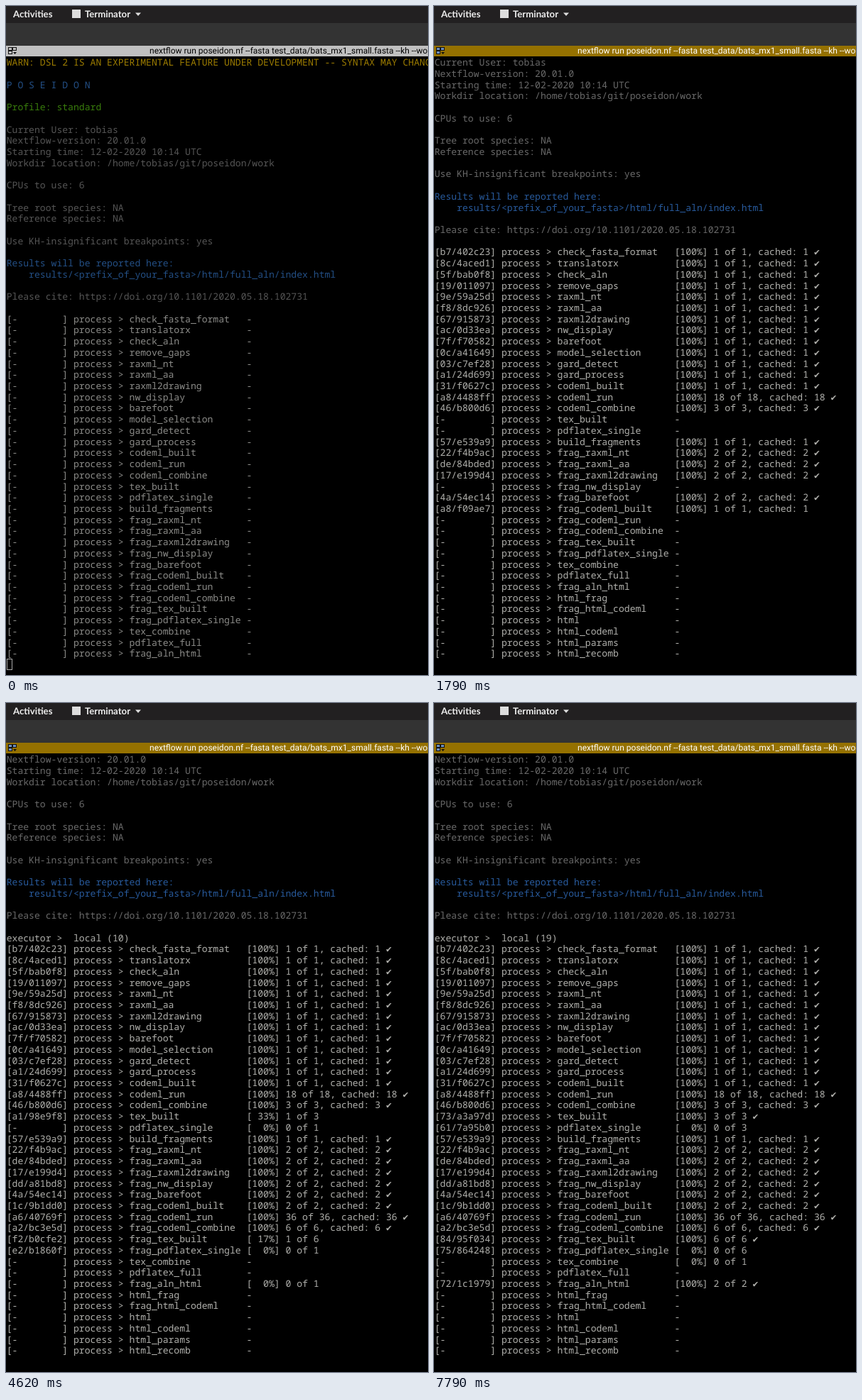
Recreate the animation shown at these times as an HTML page. Size 594 by 943 pixels, loop 8000 ms.

```html
<!DOCTYPE html>
<html lang="en">
<head>
<meta charset="utf-8">
<style>
  html, body { margin: 0; width: 100%; height: 100%; overflow: hidden; background: #000; }
  body {
    position: relative; text-rendering: geometricPrecision;
    --bar: #c0c0c0; --title: #000; --icon: #111; --pane: #c0c0c0; --text: #8b8b88;
    --dim: #555; --blue: #234f85; --warn: #9c7c00; --green: #397d0c;
  }
  body.focus {
    --bar: #957100; --title: #fff; --icon: #111; --pane: #6d8fc0; --text: #b0b0ac;
    --dim: #696969; --blue: #285a9c; --warn: #a48300; --green: #30cf28;
  }
  body > * { position: absolute; left: 0; margin: 0; white-space: pre; }
  #top { top: 0; width: 100%; height: 24px; background: #222021; }
  #tabs { top: 24px; width: 100%; height: 32px; background: #333; }
  #bar { top: 56px; width: 100%; height: 15px; background: var(--bar); }
  .app { top: 3px; font: 700 13.2px/16px Lato, sans-serif; color: #eee; }
  #title { top: 56px; left: 202px; font: 12px/15px Roboto, sans-serif; color: var(--title); }
  #term {
    top: 72.2px; left: .7px; color: var(--text);
    font: 13.1px/15.717px "Noto Sans Mono", "DejaVu Sans Mono", monospace;
  }
  #cursor {
    top: 920px; left: 1px; width: 8px; height: 16px;
    box-sizing: border-box; border: 1px solid #aaa;
  }
  .focus #cursor { background: #b0b0ac; border-color: #b0b0ac; }
  .dim { color: var(--dim); }
  .blue { color: var(--blue); }
  .warn { color: var(--warn); }
  .green { color: var(--green); }
</style>
</head>
<body>
<div id="top"></div>
<div id="tabs"></div>
<div id="bar"></div>
<div class="app" style="left:10px">Activities</div>
<div class="app" style="left:111px">Terminator</div>
<svg width="200" height="71" style="top:0">
  <rect x="93" y="5" width="12" height="12" fill="#ddd"/>
  <path d="M182 9.5h8l-4 4.5z" fill="#ddd"/>
  <g fill="var(--pane)" stroke="var(--icon)">
    <rect x="3.5" y="58.5" width="5" height="4"/>
    <rect x="9.5" y="58.5" width="5" height="4"/>
    <rect x="3.5" y="63.5" width="5" height="4"/>
  </g>
  <path d="M10 65h5l-2.5 3z" fill="var(--icon)"/>
</svg>
<div id="title">nextflow run poseidon.nf --fasta test_data/bats_mx1_small.fasta --kh --workdir work</div>
<pre id="term"></pre>
<div id="cursor"></div>

<script>
const LOOP = 8000, ROWS = 54, FOCUS = 1150;

// Each line is "class|text".
const intro = `warn|WARN: DSL 2 IS AN EXPERIMENTAL FEATURE UNDER DEVELOPMENT -- SYNTAX MAY CHANGE

blue|P O S E I D O N

green|Profile: standard

dim|Current User: tobias
dim|Nextflow-version: 20.01.0
dim|Starting time: 12-02-2020 10:14 UTC
dim|Workdir location: /home/tobias/git/poseidon/work

dim|CPUs to use: 6

dim|Tree root species: NA
dim|Reference species: NA

dim|Use KH-insignificant breakpoints: yes

blue|Results will be reported here:
blue|    results/&lt;prefix_of_your_fasta>/html/full_aln/index.html

dim|Please cite: https://doi.org/10.1101/2020.05.18.102731
`.split('\n').map(line => {
  const [cls, text] = line.split('|');
  return text ? `<span class="${cls}">${text}</span>` : '';
});

const names = `check_fasta_format translatorx check_aln remove_gaps raxml_nt raxml_aa
  raxml2drawing nw_display barefoot model_selection gard_detect gard_process codeml_built
  codeml_run codeml_combine tex_built pdflatex_single build_fragments frag_raxml_nt
  frag_raxml_aa frag_raxml2drawing frag_nw_display frag_barefoot frag_codeml_built
  frag_codeml_run frag_codeml_combine frag_tex_built frag_pdflatex_single tex_combine
  pdflatex_full frag_aln_html html_frag frag_html_codeml html html_codeml html_params
  html_recomb`.split(/\s+/);

// Updates: time, tasks run, then "name hash done/total"; * = cached, + = still open.
const updates = [
  [0, 0, ''],
  [1250, 0, ''],
  [1620, 0, `check_fasta_format b7/402c23 1/1*
    translatorx 8c/4aced1 1/1*
    check_aln 5f/bab0f8 1/1*
    remove_gaps 19/011097 1/1*
    raxml_nt 9e/59a25d 1/1*
    raxml_aa f8/8dc926 1/1*
    raxml2drawing 67/915873 1/1*
    nw_display ac/0d33ea 1/1*
    barefoot 7f/f70582 1/1*
    model_selection 0c/a41649 1/1*
    gard_detect 03/c7ef28 1/1*
    gard_process a1/24d699 1/1*
    codeml_built 31/f0627c 1/1*`],
  [1790, 0, `codeml_run a8/4488ff 18/18*
    codeml_combine 46/b800d6 3/3*
    build_fragments 57/e539a9 1/1*
    frag_raxml_nt 22/f4b9ac 2/2*
    frag_raxml_aa de/84bded 2/2*
    frag_raxml2drawing 17/e199d4 2/2*
    frag_barefoot 4a/54ec14 2/2*
    frag_codeml_built a8/f09ae7 1/1*+`],
  [2040, 8, `tex_built b1/be9566 0/3
    frag_nw_display dd/a81bd8 2/2*
    frag_codeml_built 1c/9b1dd0 2/2*
    frag_codeml_run a6/40769f 36/36*
    frag_codeml_combine a2/bc3e5d 6/6*
    frag_tex_built 18/cd2d49 0/6`],
  [4250, 9, `frag_tex_built f2/b0cfe2 1/6
    frag_pdflatex_single e2/b1860f 0/1`],
  [4620, 10, `tex_built a1/98e9f8 1/3
    pdflatex_single - 0/1
    frag_aln_html - 0/1`],
  [4980, 12, `tex_built 73/a3a97d 2/3
    pdflatex_single f6/5e333e 0/2
    frag_tex_built 5d/07c41e 2/6
    frag_pdflatex_single 90/d2a6b3 0/2
    frag_aln_html 72/1c1979 0/2`],
  [5180, 13, `tex_built 73/a3a97d 3/3
    pdflatex_single f6/5e333e 0/3
    frag_tex_built c4/1b98e0 3/6
    frag_pdflatex_single 90/d2a6b3 0/3`],
  [5390, 15, `frag_tex_built 2e/6f70d5 4/6
    frag_pdflatex_single 3b/a815cf 0/4`],
  [5580, 16, `frag_tex_built aa/a36e7d 5/6
    frag_pdflatex_single be/19ff0b 0/5`],
  [7020, 18, `pdflatex_single 61/7a95b0 0/3
    frag_tex_built 84/95f034 6/6
    frag_pdflatex_single 75/864248 0/6`],
  [7790, 19, `tex_combine - 0/1
    frag_aln_html 72/1c1979 2/2`]
];

const blinks = [1700, 2300, 2910, 3500, 4100, 4730, 5300, 5860, 6460, 7070, 7670];

function progress(state) {
  if (!state) return '-';
  const [done, total] = state.match(/\d+/g);
  const percent = Math.round(100 * done / total);
  const cached = state.includes('*') ? `, cached: ${done}` : '';
  const tick = done === total && !state.includes('+') ? ' ✔' : '';
  return `[${String(percent).padStart(3)}%] ${done} of ${total}${cached}${tick}`;
}

const jobs = {};
const screens = updates.map(([time, tasks, changes]) => {
  for (const change of changes.split('\n').filter(Boolean)) {
    const [name, hash, state] = change.trim().split(' ');
    jobs[name] = { hash, state };
  }
  const listed = time ? names : names.slice(0, 31);
  const rows = listed.map(name => {
    const { hash = '-', state } = jobs[name] || {};
    return `[${hash.padEnd(9)}] process > ${name.padEnd(20)} ${progress(state)}`;
  });
  const executor = tasks ? [`executor >  local (${tasks})`] : [];
  return [...intro, ...executor, ...rows].slice(-ROWS).join('\n');
});

const term = document.getElementById('term');
const cursor = document.getElementById('cursor');
let shown = -1;

function draw() {
  const t = performance.now() % LOOP;
  const current = updates.filter(([time]) => time <= t).length - 1;
  if (current !== shown) term.innerHTML = screens[shown = current];
  document.body.classList.toggle('focus', t >= FOCUS);
  const flips = blinks.filter(time => time <= t).length;
  cursor.style.visibility = flips % 2 ? 'hidden' : 'visible';
  requestAnimationFrame(draw);
}
draw();
</script>
</body>
</html>
```
